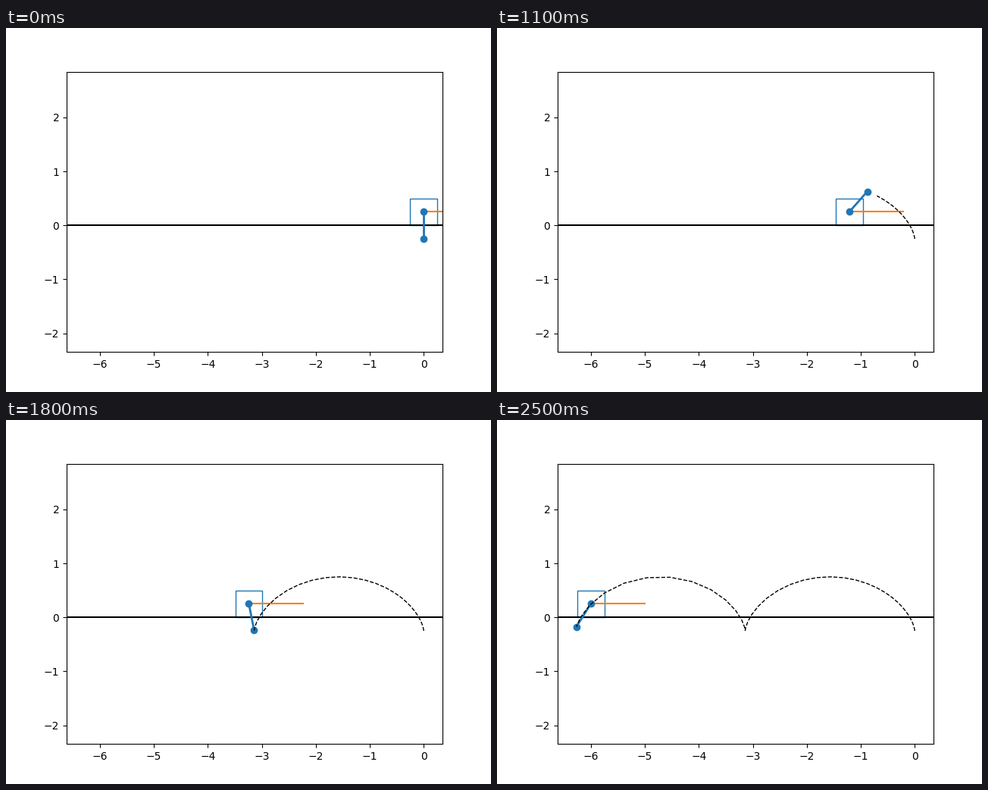
Write a matplotlib script that moves like this. It is 640 by 480 pixels and loops after 3750 ms.

```python
import numpy as np
import matplotlib.pyplot as plt
from matplotlib.animation import FuncAnimation
from matplotlib.patches import Rectangle

plt.rcParams["font.family"] = "DejaVu Sans"

STEP_MS = 50
LOOP_MS = 3750
STEPS = 50
ROD = 0.5
SIDE = 0.5
HEIGHT = 0.25
SCALE = 71.2  # pixels per unit

# The cart accelerates to the left while the rod turns as if rolling.
t = np.arange(STEPS) * STEP_MS / 1000
travel = t**2
angle = travel / ROD
cart_x = -travel
bob_x = cart_x + ROD * np.sin(angle)
bob_y = HEIGHT - ROD * np.cos(angle)

fig, ax = plt.subplots(figsize=(6.4, 4.8), dpi=100)
mid_x = bob_x[-1] / 2
half_w, half_h = 248 / SCALE, 184.8 / SCALE
ax.set_xlim(mid_x - half_w, mid_x + half_w)
ax.set_ylim(HEIGHT - half_h, HEIGHT + half_h)

ax.axhline(0, color="black", lw=1.5)
box = ax.add_patch(Rectangle((0, 0), SIDE, SIDE, fill=False, ec="tab:blue", lw=1))
arm, = ax.plot([], [], color="tab:orange", lw=1.5)
rod, = ax.plot([], [], "o-", color="tab:blue", lw=2)
trace, = ax.plot([], [], "k--", lw=1)


def update(frame):
    i = min(frame, STEPS - 1)
    x = cart_x[i]
    box.set_x(x - SIDE / 2)
    arm.set_data([x, x + 1], [HEIGHT, HEIGHT])
    rod.set_data([x, bob_x[i]], [HEIGHT, bob_y[i]])
    trace.set_data(bob_x[:frame], bob_y[:frame])
    return box, arm, rod, trace


def init():
    return update(0)


anim = FuncAnimation(fig, update, frames=LOOP_MS // STEP_MS, init_func=init,
                     interval=STEP_MS, repeat=True, repeat_delay=0, blit=False)
plt.show()
```
